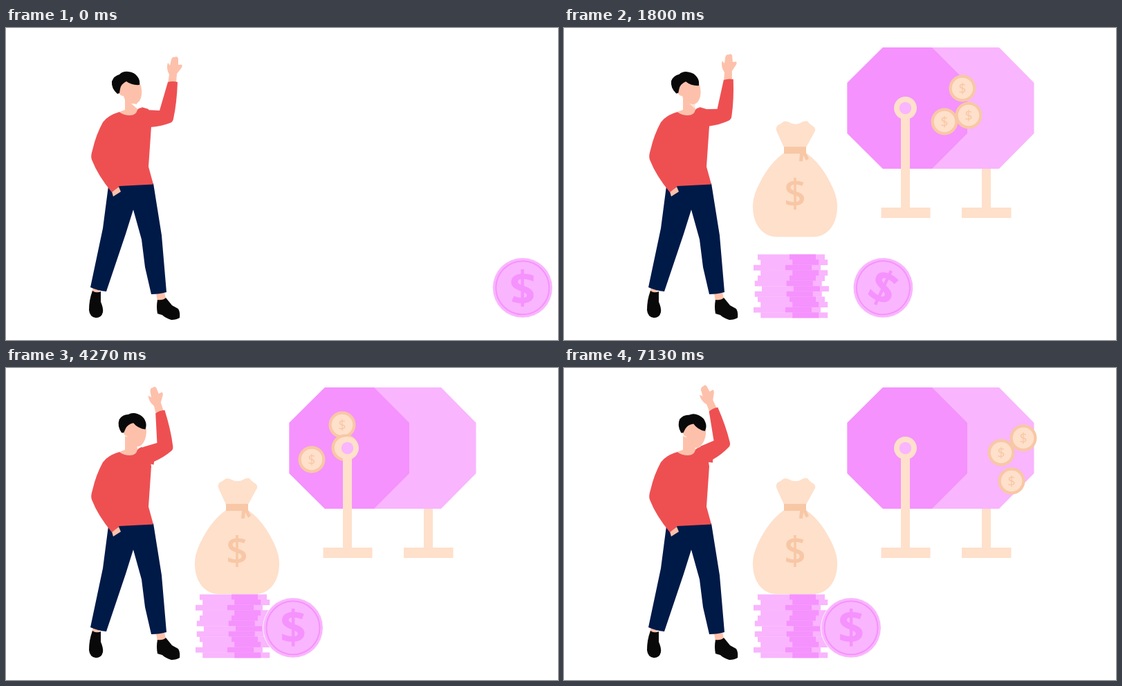
Write an HTML page that moves like this. It is 798 px wide and 450 px high and loops after 7.19 s.

```html
<!DOCTYPE html>
<html lang="en">
<head>
<meta charset="utf-8">
<title>Savings</title>
<style>
  html, body { margin: 0; width: 100%; height: 100%; overflow: hidden; background: #fff; }
  svg { display: block; width: 798px; height: 450px; }
  text { font-family: "Open Sans", "Noto Sans", sans-serif; text-anchor: middle; }
  .red { fill: #ee5052; }
  .skin { fill: #fdc1ab; }
  .black { fill: #090909; }
  .navy { fill: #001a48; }
  .light { fill: #f9b5fd; }
  .deep { fill: #f592fd; }
  .cream { fill: #fee0cb; }
  .tan { fill: #f8c7a5; }
</style>
</head>
<body>
<svg viewBox="0 0 798 450">
  <defs>
    <g id="token">
      <circle r="19.5" class="tan"/>
      <circle r="15.3" class="cream"/>
      <text y="7" font-size="20" class="tan">$</text>
    </g>
  </defs>

  <g id="man">
    <path class="skin" d="M126 374L135 378L132 385L124 381ZM217 383L229 381L231 391L219 394Z"/>
    <path class="black" d="M125 379Q130 383 137 380L137 395Q141 404 140 410Q138 418 130 418Q121 417 120 407Q120 392 125 379Z"/>
    <path class="black" d="M219 392Q227 393 231 389Q236 395 240 400L249 405Q252 410 251 418Q246 421 239 421Q230 418 226 414L219 412Q217 402 219 392Z"/>
    <path class="navy" d="M148 228L213 224L225 299L232 381Q222 384 210 384L201 345L196 305L184 262L173 297L145 380Q133 379 122 374L140 289Z"/>
    <path class="skin" d="M153 236L163 229L166 236L155 243Z"/>
    <g id="arm">
      <g id="hand"><path class="skin" d="M234 80L236 67Q231 58 234 50L237 54L239 45Q241 41 244 42Q248 40 249 44L249 53L252 53Q256 52 254 57L247 66L246 79Z"/></g>
      <path class="red" d="M201 118L222 119L234 78Q241 76 248 78Q247 108 242 131Q241 136 237 137Q224 142 209 143L207 147L188 135Z"/>
    </g>
    <path class="red" d="M164 121Q178 131 192 116L196 114L206 117L210 142L206 200L213 225.5L164 228L153 237Q133 213 124 190Q122 185 125 176Q130 154 140 136Q147 126 164 121Z"/>
    <path class="skin" d="M172 98L189 106L190 118Q188 126 179 126Q170 126 164 121L172 118Z"/>
    <path id="gap" fill="#fff" d="M180 108L189 110L197 115L189 116Z"/>
    <g id="head">
      <path class="skin" d="M163 80L176 72L194 80Q198 92 195 101Q192 109 186 109Q178 110 172 104L170 98Q165 98 163 93Z"/>
      <path class="black" d="M161 95Q152 87 153 77Q156 69 164 67Q169 62 177 63Q186 64 190 70Q194 75 193 82Q182 83 174 77Q166 81 165 88L164 94Z"/>
    </g>
  </g>

  <g id="stack"></g>

  <g id="bag">
    <path class="cream" d="M318 197L308 175Q305 169 309 165Q314 163 317 160Q321 158 326 161Q333 165 341 162Q347 158 352 159Q354 163 361 167Q365 171 362 175L350 197Z"/>
    <path class="cream" d="M318 205L350 205Q370 219 384 246Q396 268 395 284Q394 311 376 322Q369 326 360 326L308 326Q299 326 292 322Q274 311 273 284Q272 268 284 246Q298 219 318 205Z"/>
    <path class="tan" d="M318 196H350V205L354 213L350 216L346 208L345 217H340L341 206H318Z"/>
    <text x="334" y="283" font-size="56" font-weight="600" class="tan">$</text>
  </g>

  <path id="backLeg" class="cream" d="M604 190H617V259H646.5V274H575V259H604Z"/>
  <g id="drum">
    <path class="light" d="M461 28H629L679.5 79V152L629 203H461L409.5 152V79Z"/>
    <path class="deep" d="M461 28H532L583 79V152L532 203H461L409.5 152V79Z"/>
    <use href="#token"/><use href="#token"/><use href="#token"/>
  </g>
  <g id="frontLeg">
    <path class="cream" d="M487 116H500V259H529.5V274H458.5V259H487Z"/>
    <circle cx="493.5" cy="115.5" r="16.5" class="cream"/>
    <circle cx="493.5" cy="115.5" r="8.7" class="light"/>
  </g>

  <g id="coin">
    <circle r="43.4" class="light" stroke="#fff" stroke-width=".8"/>
    <circle r="38.5" fill="none" stroke="#f592fd" stroke-width="2"/>
    <text y="23" font-size="66" font-weight="700" class="deep">$</text>
  </g>
</svg>
<script>
const LOOP = 7190, WAVE = 1600;
const el = id => document.getElementById(id);
const move = (id, value) => el(id).setAttribute('transform', value);
const clamp = u => Math.max(0, Math.min(1, u));
const sine = u => (1 - Math.cos(Math.PI * clamp(u))) / 2;

// Overshooting entrance, 600 ms long
const pop = (t, start) => {
  const v = clamp((t - start) / 600) - 1;
  return Math.max(0, 1 + 2.70158 * v ** 3 + 1.70158 * v * v);
};
const scaleAt = (x, y, s) => `translate(${x} ${y}) scale(${s}) translate(${-x} ${-y})`;

// Uneven pile: every layer is shifted by three eighths of a turn
for (let i = 0; i < 12; i++) {
  const x = 280 - 6 * Math.cos((i - 2) * Math.PI * 0.75), y = 326.5 + i * 7.62;
  el('stack').innerHTML +=
    `<path class="light" d="M${x} ${y}h97v7.9h-97z"/><path class="deep" d="M${x + 46} ${y}h38v7.9h-38z"/>`;
}

// Key points of the three tumbling tokens
const times = [1270, 1800, 2870, 3500, 4270, 5470, 6150, 7130];
const tracks = [
  '610,59 576,87 503,87 495,84 486,82 523,57 580,38 664,101',
  '549,121 550,135 503,143 494,128 490,115 553,117 591,135 647,163',
  '625,144 585,126 554,167 510,186 442,132 463,62 530,78 632,122'
].map(track => track.split(' ').map(p => p.split(',').map(Number)));
const tokens = el('drum').querySelectorAll('use');

// Smooth curve through unevenly timed points
function along(points, t) {
  const last = times.length - 1;
  let i = 0;
  while (i < last - 1 && t > times[i + 1]) i++;
  const span = times[i + 1] - times[i], u = clamp((t - times[i]) / span);
  const slope = (k, axis) => {
    const p = Math.max(0, k - 1), n = Math.min(last, k + 1);
    return (points[n][axis] - points[p][axis]) / (times[n] - times[p]) * span;
  };
  return [0, 1].map(axis =>
    points[i][axis] * (1 + 2 * u) * (1 - u) ** 2 + slope(i, axis) * u * (1 - u) ** 2 +
    points[i + 1][axis] * u * u * (3 - 2 * u) + slope(i + 1, axis) * u * u * (u - 1));
}

function draw(t) {
  const wave = (1 - Math.cos(2 * Math.PI * t / WAVE)) / 2;
  move('arm', `rotate(${-26 * wave} 188 124)`);
  move('hand', `rotate(${-4 * wave} 240.5 78.5)`);
  move('head', `rotate(${18.5 * wave} 170 120)`);
  el('gap').setAttribute('opacity', clamp(1 - 2.8 * wave));

  const roll = sine((t + 40) / 2435);
  move('coin', `translate(${747 - 332 * roll} 374.7) rotate(${180 * (1 - roll)})`);

  move('stack', scaleAt(326, 372.5, pop(t, 100)));
  move('backLeg', scaleAt(610, 274, pop(t, 500)));
  move('frontLeg', scaleAt(494, 274, pop(t, 500)));

  const size = pop(t, 970);
  move('drum', scaleAt(544.5, 115.5, size));
  const lift = -49.5 * (1 - sine((t - 1470) / 660));
  move('bag', `translate(0 ${lift}) ` + scaleAt(334, 242.8, size));
  tracks.forEach((points, i) => tokens[i].setAttribute('transform', `translate(${along(points, t)})`));
}

const begin = performance.now();
function tick() {
  draw((performance.now() - begin) % LOOP);
  requestAnimationFrame(tick);
}
tick();
</script>
</body>
</html>
```
